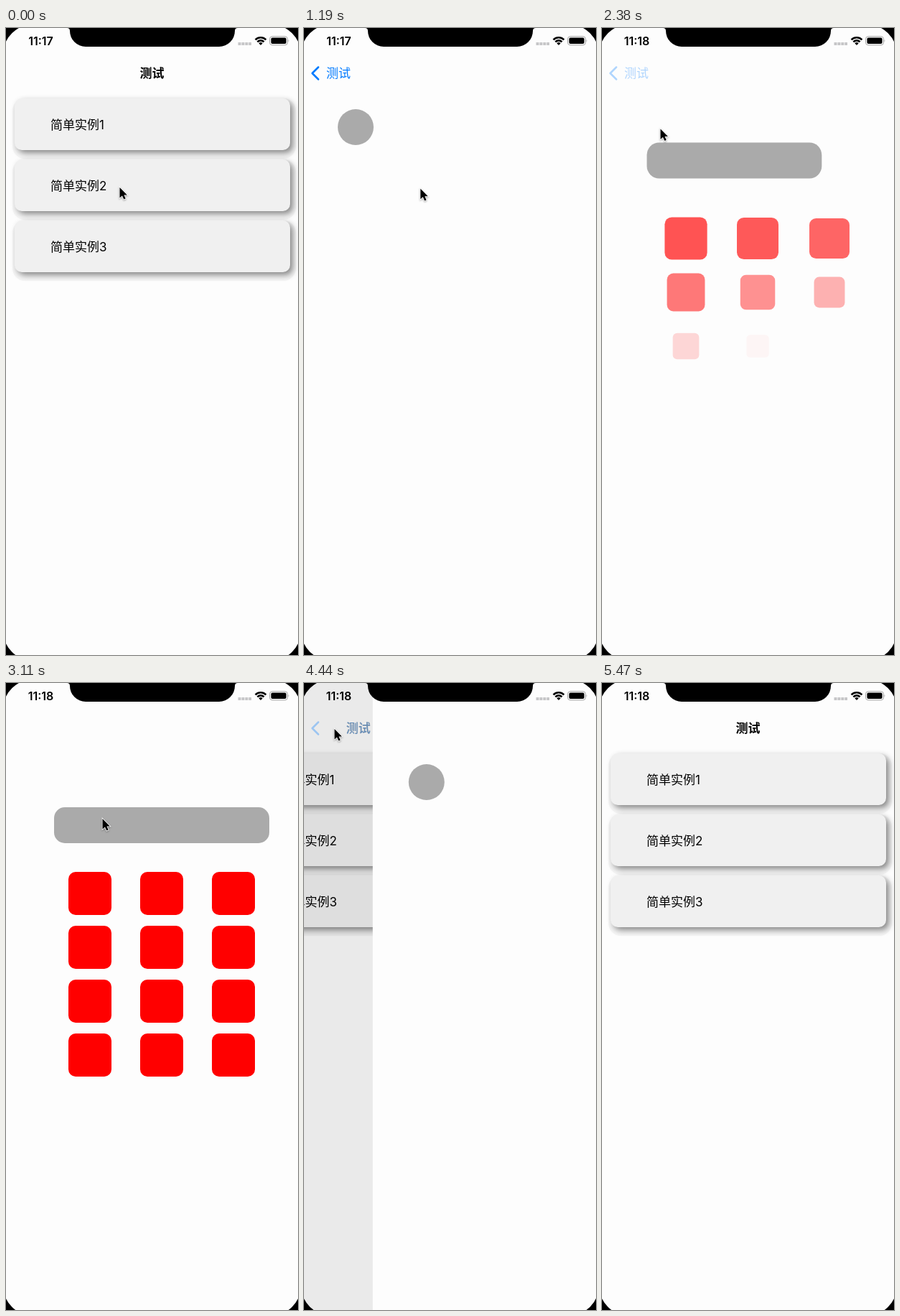
An HTML page that plays this animation: 407x873 px, repeating every 5890 ms.

```html
<!DOCTYPE html>
<html lang="zh-CN">
<head>
<meta charset="utf-8">
<style>
html, body { margin: 0; width: 100%; height: 100%; overflow: hidden; background: #fdfdfd; }
svg { display: block; width: 407px; height: 873px; }
text { font: 17px Inter, "Noto Sans CJK SC", "Noto Sans CJK", sans-serif; }
.card { fill: #f0f0f0; filter: drop-shadow(4px 4px 4px rgba(0, 0, 0, .45)); }
#title { font-weight: 700; }
#clock { font-size: 16px; font-weight: 600; text-anchor: middle; }
</style>
</head>
<body>
<svg viewBox="0 0 407 873">
  <g id="list"></g>
  <rect id="dim" width="407" height="873"/>
  <g id="detail">
    <rect x="-3" width="414" height="873" fill="#fdfdfd"/>
    <rect id="bar" height="50" fill="#aaa"/>
    <g id="grid" fill="red"></g>
  </g>
  <g id="nav">
    <path id="chevron" d="M20 54.5 11.5 63 20 71.5" fill="none" stroke="#007aff" stroke-width="2.5" stroke-linecap="round" stroke-linejoin="round"/>
    <text id="label" y="69" fill="#007aff">测试</text>
    <text id="title" y="69">测试</text>
  </g>
  <g id="status">
    <text id="clock" x="48.5" y="23.8"></text>
    <path d="M323.5 22H342" stroke="#c6c6c8" stroke-width="4" stroke-dasharray="4 .9"/>
    <g fill="none" stroke="#000" stroke-width="2.6">
      <path d="M347.6 16.4a10.4 10.4 0 0 1 14.8 0M350.4 19.3a6.5 6.5 0 0 1 9.2 0"/>
    </g>
    <path d="M355 24l-2.7-2.8a3.9 3.9 0 0 1 5.4 0z"/>
    <rect x="367.5" y="11.8" width="25" height="12" rx="3.6" fill="none" stroke="#a3a3a3"/>
    <rect x="369.4" y="13.6" width="21.2" height="8.4" rx="2"/>
    <path d="M393.6 16q1.8 1.8 0 3.8z" fill="#a3a3a3"/>
  </g>
  <path id="cursor" d="M0 0V14.5L3.4 11.4 5.8 16.6 8.2 15.6 6 10.5H10.4Z" stroke="#fff" stroke-width="1.6" paint-order="stroke" style="filter: drop-shadow(0 1px 1px rgba(0, 0, 0, .35))"/>
  <path d="M85 0q4 0 4 4a22 22 0 0 0 22 22H297a22 22 0 0 0 22-22q0-4 4-4z"/>
  <rect x="-34" y="-35" width="475" height="946" rx="72" fill="none" stroke="#000" stroke-width="60"/>
</svg>
<script>
const LOOP = 5890, HOLD = 600, STEP = 147.7, LAST_STEP = 33;
const PUSH = 580, OPEN = 2115, CLOSE = 3330, POP = 4352, MINUTE = 1925;
const $ = id => document.getElementById(id);
const mix = (a, b, p) => a + (b - a) * p;
const set = (el, attrs) => { for (const k in attrs) el.setAttribute(k, attrs[k]); };

$('list').innerHTML = '<rect x="-3" width="540" height="873" fill="#fdfdfd"/>' + [1, 2, 3].map(n => {
  const y = 13 + 85 * n;
  return `<rect x="9" y="${y}" width="395" height="84" rx="17" fill="#f5f5f5"/>
    <rect class="card" x="12" y="${y}" width="384" height="72" rx="10"/>
    <text x="62" y="${y + 43}">简单实例${n}</text>`;
}).join('');
$('grid').innerHTML = '<rect/>'.repeat(12);
const tiles = [...$('grid').children];

// Lightly damped spring from 0 to 1; t in ms, w in rad/s
function spring(t, w) {
  if (t <= 0) return 0;
  const x = w * t / 1000;
  const v = 1 - Math.exp(-.825 * x) * (Math.cos(.565 * x) + 1.46 * Math.sin(.565 * x));
  return v > .985 ? 1 : v;
}

// time, x, y
const path = [
  [0, 158.5, 222], [600, 158.5, 222], [1190, 162.5, 224], [1630, 81.5, 140.5],
  [2380, 81.5, 140.5], [2820, 97.5, 158], [3110, 134.5, 189], [3560, 134.5, 189],
  [3700, 137.5, 177.5], [4290, 42.5, 64], [4590, 42.5, 64], [5330, 250, 900], [LOOP, 250, 900]
];

function cursorAt(t) {
  const i = path.findIndex(k => k[0] > t);
  const [a, b] = [path[i - 1], path[i]];
  const p = (t - a[0]) / (b[0] - a[0]);
  return [mix(a[1], b[1], p), mix(a[2], b[2], p)];
}

function draw(t) {
  // Navigation: 0 = list, 1 = detail page
  const page = spring(t - PUSH, 10) - spring(t - POP, 10);
  const back = 1 - page;
  set($('list'), { transform: `translate(${-124 * page})` });
  set($('dim'), { opacity: .1 * page });
  set($('detail'), { transform: `translate(${414 * back})` });

  // Circle opens into a bar with a grid of tiles
  const shut = 1 - spring(t - CLOSE, 11.4);
  const open = spring(t - OPEN, 9.35) * shut;
  const fade = spring(t - OPEN, 8.2) * shut;
  set($('bar'), { x: mix(47, 67, open), y: mix(113, 173, open), width: mix(50, 300, open), rx: mix(25, 15, open) });
  set($('grid'), { opacity: fade });
  tiles.forEach((tile, i) => {
    const s = spring(t - OPEN - 33.5 * i, 15) * shut;
    const size = mix(30, 60, s);
    set(tile, {
      x: 117 + 100 * (i % 3) - size / 2,
      y: 293 + 75 * Math.floor(i / 3) - size / 2,
      width: size, height: size, rx: size / 6, opacity: s
    });
  });

  const x = mix(31, 186.5, back ** 1.2);
  set($('nav'), { opacity: 1 - fade });
  set($('chevron'), { opacity: Math.max(0, 1 - 2.8 * back) });
  set($('label'), { x, opacity: Math.max(0, 1 - 2.2 * back) });
  set($('title'), { x, opacity: back });

  $('clock').textContent = t < MINUTE ? '11:17' : '11:18';
  set($('cursor'), { transform: `translate(${cursorAt(t)})` });
}

const start = performance.now();
function tick() {
  const t = (performance.now() - start) % LOOP;
  const n = Math.min(LAST_STEP, Math.floor((t - HOLD) / STEP));
  draw(t < HOLD ? 0 : HOLD + n * STEP);
  requestAnimationFrame(tick);
}
tick();
</script>
</body>
</html>
```
